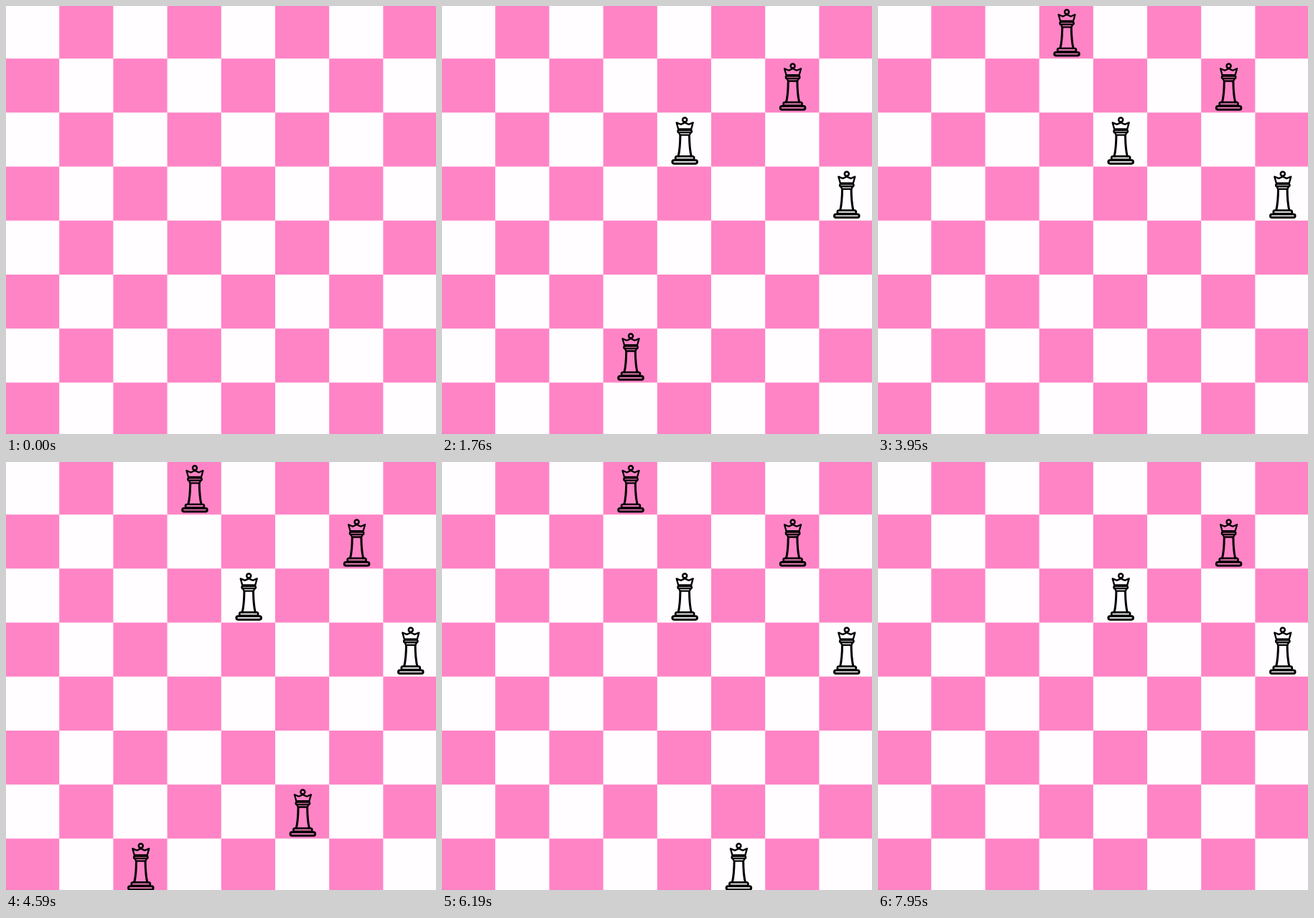
An HTML page with a canvas that plays this animation: 599x596 px, repeating every 8000 ms.

```html
<!DOCTYPE html>
<html lang="en">
<head>
<meta charset="utf-8">
<title>Eight queens backtracking</title>
<style>
  html, body { margin: 0; width: 100%; height: 100%; overflow: hidden; background: #fffdff; }
  canvas { display: block; }
</style>
</head>
<body>
<canvas id="stage" width="599" height="596"></canvas>
<script>
const ctx = document.getElementById('stage').getContext('2d');
const LOOP = 8000, START = 160, STEP = 320;
const CELL = 75.2, LEFT = -1, TOP = -2;

// Each move places a queen as [column, row]; null takes the latest one back.
const back = null;
const moves = [
  [7, 3], [6, 1], [4, 2],
  [3, 6], [5, 7], back, back,
  [3, 0], [5, 4], [2, 6], back, back,
  [5, 6], [2, 7], [1, 4], back, back, back,
  [5, 7], [2, 6], [1, 4], back, back, back, back
];

function queensAt(time) {
  const count = Math.floor((time - START) / STEP) + 1;
  const stack = [];
  for (const move of moves.slice(0, Math.max(0, count))) {
    if (move) stack.push(move);
    else stack.pop();
  }
  return stack;
}

function drawBoard() {
  ctx.fillStyle = '#fffdff';
  ctx.fillRect(0, 0, 599, 596);
  ctx.fillStyle = '#ff84c6';
  for (let row = 0; row < 8; row++) {
    for (let col = 1 - row % 2; col < 8; col += 2) {
      ctx.fillRect(LEFT + col * CELL, TOP + row * CELL, CELL, CELL);
    }
  }
  ctx.fillStyle = '#777';
  ctx.fillRect(0, 595, 1, 1);
}

// Outline pieces, centred on x = 0 and measured down from the cell's top edge.
function bar(halfWidth, y, height, radius) {
  const path = new Path2D();
  path.roundRect(-halfWidth, y, halfWidth * 2, height, radius);
  return path;
}
const ball = new Path2D();
ball.arc(0, 10.2, 3, 0, Math.PI * 2);
const parts = [
  [ball, 2.5],
  [new Path2D('M-11.5 14 L-9 23 H9 L11.5 14 L5.5 16.5 L0 14 L-5.5 16.5 Z'), 2.3],
  [bar(9.7, 24.3, 3.4, 1.7), 2.5],
  [new Path2D('M-8 28.5 L-6.5 31.3 H6.5 L8 28.5'), 2.3],
  [new Path2D('M-6.3 32 Q-6.5 50 -9 60.5 M6.3 32 Q6.5 50 9 60.5'), 3],
  [bar(13, 61, 4.5, 2.2), 2.7],
  [bar(17.3, 66.4, 4.6, 2.3), 3]
];

function drawQueen([col, row]) {
  ctx.save();
  ctx.translate(LEFT + col * CELL + 38.4, TOP + row * CELL);
  ctx.strokeStyle = '#000';
  ctx.lineJoin = ctx.lineCap = 'round';
  for (const [path, width] of parts) {
    ctx.lineWidth = width;
    ctx.stroke(path);
  }
  ctx.restore();
}

function frame(now) {
  drawBoard();
  queensAt(now % LOOP).forEach(drawQueen);
  requestAnimationFrame(frame);
}
frame(0);
</script>
</body>
</html>
```
